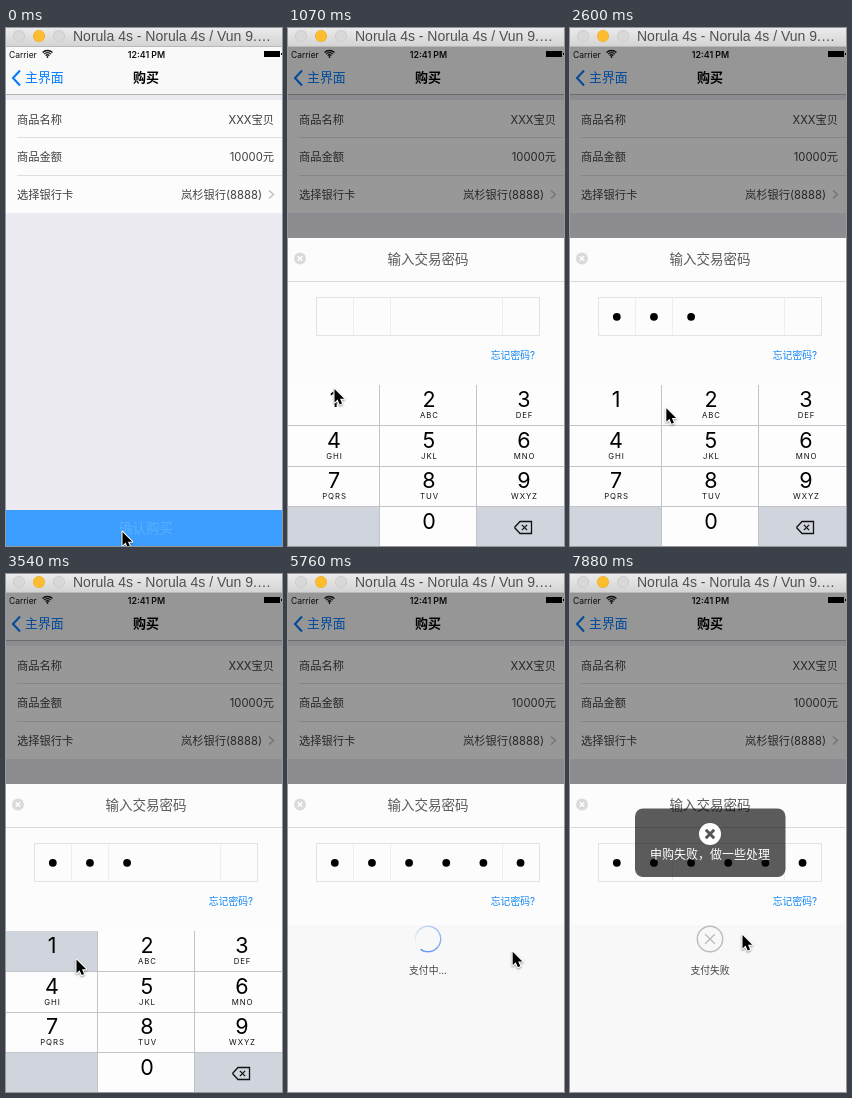
These frames come from a looping animation (276x518 px, 8 s). An HTML page with a canvas:

```html
<!DOCTYPE html>
<html lang="zh-CN">
<head>
<meta charset="utf-8">
<title>购买</title>
<style>
html, body { margin: 0; width: 100%; height: 100%; overflow: hidden; background: #ebebf1; }
canvas { display: block; width: 276px; height: 518px; }
</style>
</head>
<body>
<canvas id="stage"></canvas>
<script>
const W = 276, H = 518, LOOP = 8000;
const CJK = '"Noto Sans CJK SC", "Noto Sans CJK", sans-serif';
const UI = 'Inter, ' + CJK;
const BLUE = '#007aff';
const SHEET_IN = 210, SHEET_MS = 420, PAY = 4444, SLIDE_MS = 300, FAIL = 7460;

const canvas = document.getElementById('stage');
const dpr = window.devicePixelRatio || 1;
canvas.width = Math.round(W * dpr);
canvas.height = Math.round(H * dpr);
const c = canvas.getContext('2d');

const clamp = v => Math.max(0, Math.min(1, v));
const easeOut = v => 1 - (1 - v) ** 3;
const smooth = v => v * v * (3 - 2 * v);

// The keys 1, 2, 3 are tapped in a row, twice; a dot appears on release
function tapRow(start, gap, hold, x, y, dx, dy) {
  return [0, 1, 2].map(i => ({
    key: i, at: start + i * gap, up: start + i * gap + hold, x: x + i * dx, y: y + i * dy
  }));
}
const firstRow = tapRow(1180, 560, 170, 46, 360, 92, 10);
const secondRow = tapRow(3480, 300, 170, 61, 385, 84, -3.5);
const taps = [...firstRow, ...secondRow];

// The pointer reaches each stop at its time, after a short glide
const GLIDE = 300;
const stops = [
  { at: 0, x: 116, y: 503 },
  { at: 830, x: 46, y: 360 },
  ...firstRow,
  { at: 2700, x: 50, y: 379 },
  ...secondRow,
  { at: 6000, x: 184, y: 366 },
  { at: 6780, x: 176, y: 359 },
  { at: 7300, x: 172, y: 360 }
];

function rect(x, y, w, h, color) {
  c.fillStyle = color;
  c.fillRect(x, y, w, h);
}

function text(s, x, y, size, color, { font = UI, weight = 400, align = 'left', gap = 0 } = {}) {
  c.font = `${weight} ${size}px ${font}`;
  c.letterSpacing = gap + 'px';
  c.textAlign = align;
  c.fillStyle = color;
  c.fillText(s, x, y);
  c.letterSpacing = '0px';
}

function disc(x, y, r, color) {
  c.fillStyle = color;
  c.beginPath();
  c.arc(x, y, r, 0, Math.PI * 2);
  c.fill();
}

function arc(x, y, r, from, to, color, width) {
  c.strokeStyle = color;
  c.lineWidth = width;
  c.beginPath();
  c.arc(x, y, r, from, to);
  c.stroke();
}

function line(points, color, width) {
  c.strokeStyle = color;
  c.lineWidth = width;
  c.beginPath();
  points.forEach(([x, y]) => c.lineTo(x, y));
  c.stroke();
}

function chevron(x, y, dx, dy, color, width) {
  line([[x - dx, y - dy], [x, y], [x - dx, y + dy]], color, width);
}

function cross(x, y, r, color, width) {
  line([[x - r, y - r], [x + r, y + r]], color, width);
  line([[x + r, y - r], [x - r, y + r]], color, width);
}

function titleBar() {
  const g = c.createLinearGradient(0, 0, 0, 19);
  g.addColorStop(0, '#ebebeb');
  g.addColorStop(1, '#d3d3d3');
  rect(0, 0, W, 19, g);
  rect(0, 18, W, 1, '#b9b9b9');
  ['#d8d8d8', '#fdbd2e', '#d8d8d8'].forEach((color, i) => {
    disc(13 + i * 20, 8, 6, color);
    arc(13 + i * 20, 8, 5.7, 0, Math.PI * 2, 'rgba(0,0,0,0.08)', 0.8);
  });
  text('Norula 4s - Norula 4s / Vun 9.…', 67, 13, 14, '#505050', { font: '"Liberation Sans", sans-serif' });
}

function statusBar() {
  text('Carrier', 3, 29.5, 8.5, '#111');
  for (let r = 2.6; r < 8; r += 2.2) arc(41.5, 29.5, r, -Math.PI * 0.75, -Math.PI * 0.25, '#111', 1.3);
  disc(41.5, 29, 0.9, '#111');
  text('12:41 PM', 140.5, 29.5, 8.8, '#111', { weight: 600, align: 'center' });
  rect(258, 23, 16, 6, '#000');
  rect(275, 25, 1, 2, '#000');
}

function page(t) {
  rect(0, 19, W, H - 19, '#ebebf1');
  rect(0, 19, W, 47, '#f9f9f9');
  rect(0, 66, W, 1, '#b4b4b6');
  statusBar();
  chevron(7, 50, -7, 7.5, BLUE, 2);
  text('主界面', 19, 54, 12.9, BLUE, { font: CJK });
  text('购买', 140, 54, 13, '#000', { font: CJK, weight: 700, align: 'center' });

  rect(0, 72, W, 113, '#fcfcfc');
  const rows = [['商品名称', 'XXX宝贝'], ['商品金额', '10000元'], ['选择银行卡', '岚杉银行(8888)']];
  rows.forEach(([label, value], i) => {
    const y = 95.5 + i * 37.7, last = i === 2;
    text(label, 11, y, 11.25, '#404040');
    text(value, last ? 256 : 268, y, 11.25, '#404040', { align: 'right' });
    if (!last) rect(11, 109 + i * 38, W, 1, '#dedee1');
  });
  chevron(267.5, 166.5, 4.5, 4, '#bdbdc2', 1.3);

  rect(0, 482, W, 36, '#3c9fff');
  text('确认购买', 140, 505, 13.5, t < 230 ? '#5aaeff' : '#fff', { align: 'center' });
}

function spinner(t) {
  const head = 1.05 + (t - 4580) / 1000 * Math.PI * 2;
  const n = 48, span = Math.PI * 1.85;
  for (let i = 0; i < n; i++) {
    const a = head - span * (1 - i / n);
    arc(140, 365, 12.7, a, a + span / n + 0.01, `rgba(70,135,245,${(i + 1) / n})`, 1.3);
  }
}

function payState(t) {
  const failed = t >= FAIL;
  if (failed) {
    arc(140, 365, 12.7, 0, Math.PI * 2, '#bcbcbc', 1.4);
    cross(140, 365, 4.8, '#bcbcbc', 1.4);
  } else {
    spinner(t);
  }
  text(failed ? '支付失败' : '支付中...', 140, 399.5, 9.8, '#444', { align: 'center' });
}

function deleteIcon() {
  line([[226.5, 499.5], [232, 493.5], [243.5, 493.5], [243.5, 505.5], [232, 505.5], [226.5, 499.5]], '#111', 1.3);
  cross(236.5, 499.5, 2.6, '#111', 1.3);
}

function keypad(t) {
  const top = 357, rowH = 40.5, gray = '#d0d4dc', rule = '#c2c3c6';
  const letters = ['', 'ABC', 'DEF', 'GHI', 'JKL', 'MNO', 'PQRS', 'TUV', 'WXYZ'];
  rect(0, top, W, H - top, '#fdfdfd');
  const cell = (col, row) => rect(col * 97 - 5, top + Math.round(row * rowH), 97, 41, gray);

  const held = taps.find(p => t >= p.at && t < p.up);
  if (held) cell(held.key, 0);
  cell(0, 3);
  cell(2, 3);
  for (let i = 1; i < 4; i++) rect(0, Math.round(top - 0.5 + i * rowH), W, 1, rule);
  for (let i = 1; i < 3; i++) rect(i * 97 - 6, top, 1, H - top, rule);

  const digit = (n, col, row) =>
    text(String(n), 46 + col * 95, 379.3 + row * rowH, 21.5, '#000', { align: 'center' });
  letters.forEach((s, i) => {
    const col = i % 3, row = Math.floor(i / 3);
    digit(i + 1, col, row);
    text(s, 46.5 + col * 95, 390.3 + row * rowH, 7.8, '#111', { align: 'center', gap: 0.9 });
  });
  digit(0, 1, 3);
  deleteIcon();
}

function passwordBox(t) {
  c.strokeStyle = '#e3e3e3';
  c.lineWidth = 1;
  c.strokeRect(28.5, 269.5, 223, 38);
  const pitch = 37.15;
  [1, 2, 5].forEach(i => rect(Math.floor(28.5 + i * pitch), 270, 1, 37, '#eee'));
  taps.forEach((p, i) => {
    if (t >= p.up) disc(46.8 + i * pitch, 288.8, 3.9, '#000');
  });
}

function sheet(t) {
  const shown = easeOut(clamp((t - SHEET_IN) / SHEET_MS));
  if (!shown) return;
  rect(0, 19, W, H - 19, `rgba(0,0,0,${0.4 * shown})`);
  c.save();
  c.translate(0, (1 - shown) * 308);

  rect(0, 210, W, 308, '#fcfcfc');
  disc(12, 230.5, 6, '#dadada');
  cross(12, 230.5, 2.2, '#fff', 1.4);
  text('输入交易密码', 140, 235.5, 13.5, '#5a5a5a', { align: 'center' });
  rect(0, 253, W, 1, '#d9d9d9');
  passwordBox(t);
  text('忘记密码?', 247, 330.5, 9.8, '#0a84f5', { align: 'right' });

  const k = clamp((t - PAY) / SLIDE_MS);
  if (t >= PAY) {
    rect(0, 351, W, 167, k < 1 ? '#fafafa' : '#f8f8f8');
    payState(t);
  }
  if (k < 1) {
    c.translate(0, Math.sin(k * Math.PI / 2) * 157);
    keypad(t);
  }
  c.restore();
}

function toast(t) {
  const a = clamp((t - FAIL) / 150);
  if (!a) return;
  c.save();
  c.globalAlpha = a;
  c.fillStyle = 'rgba(0,0,0,0.64)';
  c.beginPath();
  c.roundRect(65, 234.5, 150.5, 68.5, 8);
  c.fill();
  disc(140, 260, 11, '#fff');
  cross(140, 260, 4.2, '#555', 3);
  text('申购失败，做一些处理', 140, 285, 12, '#fff', { font: CJK, weight: 500, align: 'center' });
  c.restore();
}

function pointer(t) {
  let { x, y } = stops[0];
  for (const s of stops) {
    const k = smooth(clamp((t - s.at) / GLIDE + 1));
    if (s.at > 0) {
      x += (s.x - x) * k;
      y += (s.y - y) * k;
    }
  }
  c.save();
  c.translate(x + 0.5, y + 1);
  c.scale(0.9, 0.9);
  c.beginPath();
  [[0, 0], [0, 15], [3.4, 11.8], [5.8, 17.2], [8.4, 16], [6.1, 10.8], [10.8, 10.8]]
    .forEach(p => c.lineTo(...p));
  c.closePath();
  c.lineJoin = 'round';
  c.strokeStyle = '#fff';
  c.lineWidth = 2.4;
  c.shadowColor = 'rgba(0,0,0,0.4)';
  c.shadowBlur = 2 * dpr;
  c.shadowOffsetY = dpr;
  c.stroke();
  c.shadowColor = 'transparent';
  c.fillStyle = '#000';
  c.fill();
  c.restore();
}

function frame(now) {
  const t = now % LOOP;
  c.setTransform(dpr, 0, 0, dpr, 0, 0);
  page(t);
  sheet(t);
  toast(t);
  titleBar();
  pointer(t);
  requestAnimationFrame(frame);
}
requestAnimationFrame(frame);
</script>
</body>
</html>
```
